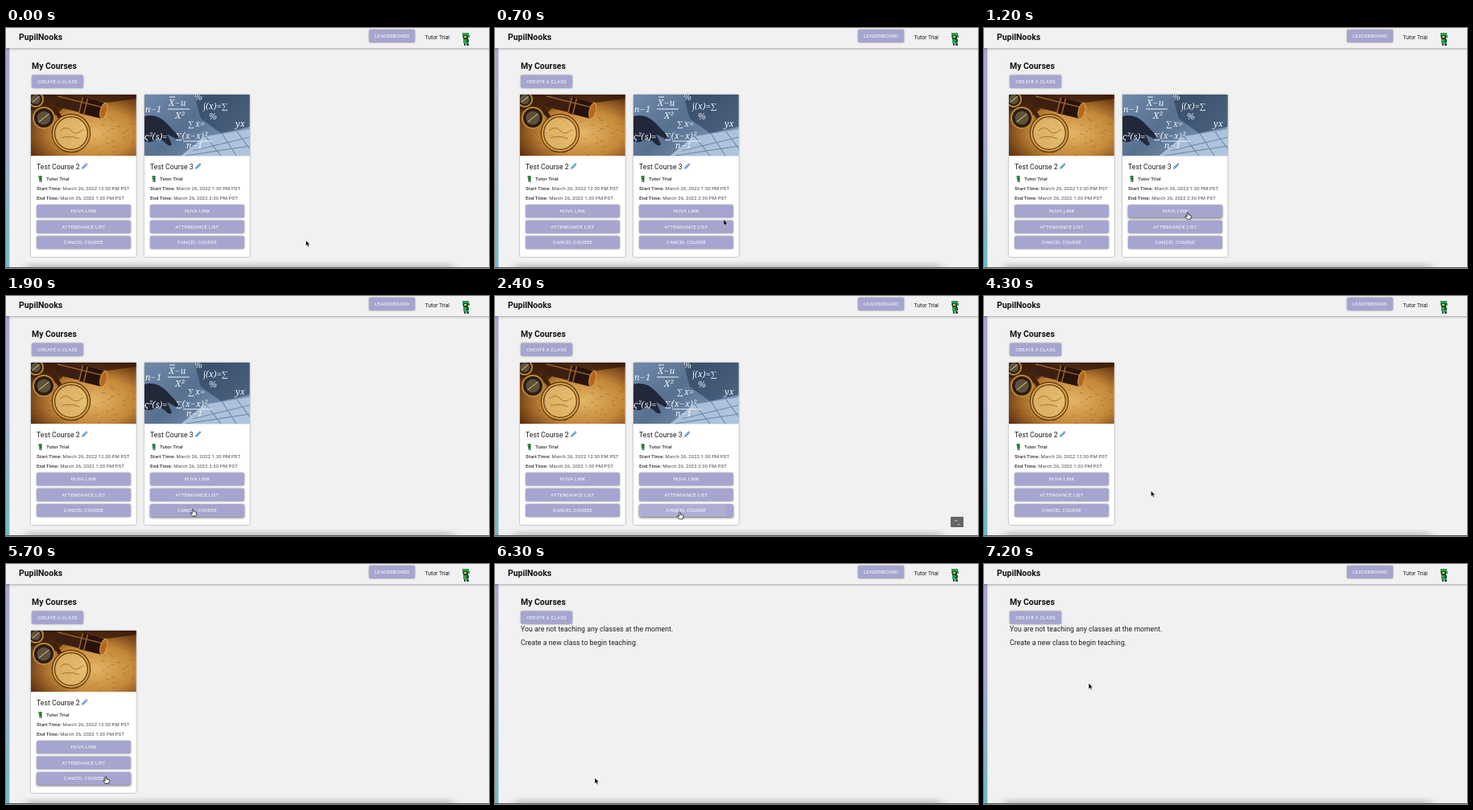
An HTML page for the animation above (7700 ms loop, 600 by 299 pixels).

```html
<!DOCTYPE html>
<html lang="en">
<head>
<meta charset="utf-8">
<title>My Courses</title>
<style>
html, body { margin: 0; width: 100%; height: 100%; overflow: hidden; background: #f1f1f1; }
svg { display: block; }
text { font: 400 6.05px Roboto, sans-serif; fill: #1c1c1c; white-space: pre; }
.head { font-size: 10.45px; font-weight: 700; fill: #111; }
.body { font-size: 8.65px; letter-spacing: .0075em; }
.user { font-size: 6.8px; }
.info { fill: #4a4a4a; letter-spacing: .0107em; }
.bold { font-weight: 700; }
.btn rect { fill: #a5a5cf; filter: drop-shadow(0 .9px .8px #0006); }
.btn.hover rect { filter: drop-shadow(0 1.2px 1.5px #0009); }
.btn text { fill: #fff; text-anchor: middle; letter-spacing: .0286em; }
.card { fill: #fff; filter: drop-shadow(0 .7px 1.1px #0006); }
.chalk text { fill: #eef3fa; font-family: "Noto Serif", serif; font-style: italic; font-size: 11px; }
</style>
</head>
<body>
<svg id="stage" width="600" height="299"></svg>
<script>
const LOOP = 7700, STEP = 100;
const stage = document.getElementById('stage');
const buttons = [];

const text = (x, y, s, cls = '') => `<text x="${x}" y="${y}" class="${cls}">${s}</text>`;

function button(x, y, w, label, card = -1) {
  buttons.push({ x, y, w, card });
  return `<g class="btn"><rect x="${x}" y="${y}" width="${w}" height="16" rx="1.8"/>` +
    text(x + w / 2, y + 10.1, label) + '</g>';
}

const avatar = (x, y, k) => `<g transform="translate(${x} ${y}) scale(${k})">
  <path fill="#2f9e4f" d="M1 0H9V3H10V6H1Z"/><path fill="#174a2c" d="M2 3H8V8H2Z"/>
  <path fill="#d9c06a" d="M3 4H6V6H3Z"/><path fill="#35a055" d="M2 8H8V13H2Z"/>
  <path fill="#1c5a35" d="M6 8H9V12H6ZM3 13H5V16H3ZM6 13H9V16H6Z"/></g>`;

const pencil = (x, y) => `<g transform="translate(${x} ${y}) rotate(-45)">
  <path fill="#4b9fd3" d="M2-1.3H8.5V1.3H2Z"/><path fill="#8ccaf0" d="M2-1.3H8.5V-.4H2Z"/>
  <path fill="#e3bd8d" d="M0 0L2-1.3V1.3Z"/><path fill="#c98a94" d="M8.5-1.3H10.3V1.3H8.5Z"/></g>`;

let seed = 5;
const rnd = () => (seed = seed * 16807 % 2147483647) / 2147483647;

function specks(n) {
  let d = '';
  for (let i = 0; i < n; i++)
    d += `M${(rnd() * 131).toFixed(1)} ${(rnd() * 76).toFixed(1)}l${(1 + rnd() * 4).toFixed(1)} ${(rnd() * 3 - 1.5).toFixed(1)}`;
  return `<path d="${d}" stroke="#6b3a10" stroke-opacity=".45" stroke-width=".8"/>`;
}

const compass = (x, y, r) => `<g transform="translate(${x} ${y})">
  <circle r="${r}" fill="#2b1c10" stroke="#b98636" stroke-width="2"/>
  <circle r="${r * .66}" fill="#5d513a"/>
  <path d="M${-r * .5} ${r * .4}L${r * .5} ${-r * .4}" stroke="#e6cf98"/></g>`;

const mapPhoto = () => `
  <rect width="131" height="76.5" fill="url(#map)"/>${specks(130)}
  <path d="M0 0H131V5L95 10 55 4 30 26 0 18Z" fill="#35190a" opacity=".75"/>
  <g transform="translate(34 -2) rotate(14)">
    <rect width="34" height="17" fill="#3c1f10"/><rect x="31" y="-2" width="29" height="20" fill="#27130a"/>
    <path d="M0 4H60M31-2V18M37-2V18" stroke="#a0662a" stroke-width="1.5"/>
    <ellipse cx="60" cy="8" rx="4" ry="10" fill="#b3671f" stroke="#e2a148"/></g>
  ${compass(6, 6, 9)}${compass(16, 29, 13)}
  <path d="M28 16L38 31" stroke="#402009" stroke-width="5"/>
  <circle cx="50" cy="48" r="22" fill="#f0cf85" fill-opacity=".55" stroke="#5c3510" stroke-width="4.5"/>
  <circle cx="50" cy="48" r="22" fill="none" stroke="#d5a147" stroke-width="2.2"/>
  <path d="M36 45q8-7 14 0t15-2M38 54q9-4 22 1" fill="none" stroke="#a7742f"/>`;

const mathPhoto = () => `
  <rect width="131" height="76.5" fill="url(#sky)"/>
  <path d="M62 0H131V40L95 48 70 30Z" fill="#243850" opacity=".55"/>
  <path d="M45 76.5L75 52 131 43V76.5Z" fill="#c0d2e8" opacity=".75"/>
  <path d="M60 70L131 53M52 76L131 64M76 52L95 76M96 48L114 76M115 46L131 68" stroke="#6f8bae" stroke-width="1.2"/>
  <path d="M0 27Q15 23 27 35L43 52Q45 57 39 55L28 49 34 62Q31 66 25 59L17 54Q8 62 0 58Z" fill="#20283a"/>
  <g class="chalk">${text(1, 22, 'n−1')}${text(30, 14, 'X−u')}${text(38, 30, 'X²')}
    <path d="M29 18H56M31 3H38" stroke="#eef3fa"/>
    ${text(73, 18, '∫(x)=∑')}${text(54, 40, '∑')}${text(63, 40, 'x=')}${text(113, 40, 'yx')}
    ${text(80, 31, '%')}${text(62, 7, '%')}
    ${text(0, 56, 'ς²(s)=')}${text(39, 55, '∑(x−x)²')}${text(52, 67, 'n−1')}
    <path d="M48 58H84" stroke="#eef3fa"/></g>`;

function course(i, photo, name, start, end) {
  const x = 31 + i * 141, tx = x + 7;
  const info = (y, label, value) =>
    `<text x="${tx}" y="${y}" class="info"><tspan class="bold">${label}</tspan> March 26, 2022 ${value} PM PST</text>`;
  return `<g class="course">
    <rect class="card" x="${x}" y="83" width="130.7" height="202" rx="2"/>
    <svg x="${x}" y="83" width="130.7" height="76.5">${photo()}</svg>
    ${text(tx, 176.4, name, 'body')}${pencil(x + 62.5, 176.3)}
    ${avatar(x + 9, 184, .5)}${text(x + 19, 190.1, 'Tutor Trial', 'info bold')}
    ${info(202.1, 'Start Time:', start)}${info(214.2, 'End Time:', end)}
    ${button(tx, 220.2, 117, 'HUVA LINK', i)}
    ${button(tx, 239.7, 117, 'ATTENDANCE LIST', i)}
    ${button(tx, 259.2, 117, 'CANCEL COURSE', i)}</g>`;
}

const gradient = (id, dir, ...stops) => `<linearGradient id="${id}" ${dir}>` +
  stops.map(([o, c, a = 1]) => `<stop offset="${o}" stop-color="${c}" stop-opacity="${a}"/>`).join('') +
  '</linearGradient>';
const down = 'x1="0" y1="0" x2="0" y2="1"';

stage.innerHTML = `<defs>
  ${gradient('side', down, [0, '#a7a7d2'], [.4, '#a3a9d2'], [1, '#70b9c8'])}
  ${gradient('fade', down, [0, '#000', .32], [.25, '#000', .12], [1, '#000', 0])}
  ${gradient('dock', down, [0, '#000', 0], [1, '#000', .2])}
  ${gradient('sky', 'x1="0" y1="0" x2="1" y2=".6"', [0, '#7189ab'], [.5, '#57708f'], [1, '#7f9abb'])}
  <radialGradient id="map" cx=".6" cy=".62" r=".7"><stop stop-color="#e3b566"/>
    <stop offset=".55" stop-color="#c48739"/><stop offset="1" stop-color="#5b2c0c"/></radialGradient>
  <filter id="soft" x="-10%" y="-100%" width="120%" height="300%"><feGaussianBlur stdDeviation="6 1"/></filter></defs>
  <rect width="600" height="299" fill="#f1f1f1"/>
  <rect y="25" width="4.3" height="273" fill="url(#side)"/>
  <rect y="25" width="600" height="4" fill="url(#fade)"/>
  <rect x="25" y="290" width="530" height="9" fill="url(#dock)" filter="url(#soft)"/>
  <rect y="298" width="600" height="1" fill="#555"/>
  ${text(16, 14.9, 'PupilNooks', 'head')}
  ${button(451, 2, 57, 'LEADERBOARD')}
  ${text(520.5, 14, 'Tutor Trial', 'user')}${avatar(566, 6, 1)}
  ${text(32, 51.4, 'My Courses', 'head')}
  ${button(32, 58.8, 64, 'CREATE A CLASS')}
  ${course(0, mapPhoto, 'Test Course 2', '12:30', '1:30')}
  ${course(1, mathPhoto, 'Test Course 3', '1:30', '2:30')}
  <g id="empty">${text(32, 84.4, 'You are not teaching any classes at the moment.', 'body')}
    ${text(32, 101.4, 'Create a new class to begin teaching.', 'body')}</g>
  <svg id="ripple" y="259.2" width="117" height="16"><circle fill="#fff" fill-opacity=".1"/></svg>
  <g id="badge"><rect x="566" y="275" width="16" height="13" rx="1" fill="#666"/>
    <path d="M571 281l1.7-2 1.7 2M575 284.500h2.500" fill="none" stroke="#ddd" stroke-width=".8"/></g>
  <path id="arrow" d="M0 0V7.200L1.700 5.700 2.800 8.200 4.100 7.700 3 5.300H5.200Z" fill="#000" stroke="#fff" stroke-width=".5"/>
  <path id="hand" d="M-.9 .6Q0-.5.8.6V3.200L3.900 3.900Q4.700 4.200 4.400 5.500L3.600 8.800H-.8L-3.100 5.700Q-3.200 4.500-2 4.900L-.9 5.700Z"
    fill="#fff" stroke="#111" stroke-width=".8"/>`;

const $ = id => document.getElementById(id);
const cards = stage.querySelectorAll('.course'), btns = stage.querySelectorAll('.btn');
const show = (el, on) => el.style.display = on ? '' : 'none';

// pointer stops: time, x, y
const path = [
  [100, 372.5, 264.5], [1000, 253, 229.5], [1300, 253, 229.5], [1600, 247, 246],
  [2000, 229.5, 269], [3300, 230, 269.5], [4000, 231.5, 245.5], [4100, 231.5, 245.5],
  [4800, 110, 231], [5100, 112, 247], [5500, 124, 264.5], [6400, 124, 266.5], [7200, 130, 148.5]
];
const gone = [6200, 2700];     // when each course disappears
const clicks = [5800, 2300];

function pointer(t) {
  if (t <= path[0][0]) return path[0].slice(1);
  const i = path.findIndex(p => p[0] >= t);
  if (i < 0) return path[path.length - 1].slice(1);
  const [t0, x0, y0] = path[i - 1], [t1, x1, y1] = path[i];
  const u = (t - t0) / (t1 - t0), e = u * u * (3 - 2 * u);
  return [x0 + (x1 - x0) * e, y0 + (y1 - y0) * e];
}

function draw(t) {
  const [x, y] = pointer(t);
  cards.forEach((c, i) => show(c, t < gone[i]));
  show($('empty'), t >= gone[0]);
  show($('badge'), t >= 2300 && t < gone[1]);

  let over = false;
  buttons.forEach((b, i) => {
    const hit = !(t >= gone[b.card]) && x >= b.x && x <= b.x + b.w && y >= b.y && y <= b.y + 16;
    btns[i].classList.toggle('hover', hit);
    over = over || hit;
  });
  for (const [id, on] of [['hand', over], ['arrow', !over]]) {
    show($(id), on);
    $(id).setAttribute('transform', `translate(${x} ${y})`);
  }

  const i = clicks.findIndex((c, k) => t >= c && t < gone[k]);
  show($('ripple'), i >= 0);
  if (i >= 0) {
    const left = 38 + i * 141, dot = $('ripple').firstChild;
    $('ripple').setAttribute('x', left);
    dot.setAttribute('cx', x - left);
    dot.setAttribute('cy', y - 259.2);
    dot.setAttribute('r', Math.min(117, (t - clicks[i]) * .58));
  }
}

const begin = performance.now();
function tick() {
  const t = (performance.now() - begin) % LOOP;
  draw(Math.floor(t / STEP) * STEP);
  requestAnimationFrame(tick);
}
tick();
</script>
</body>
</html>
```
